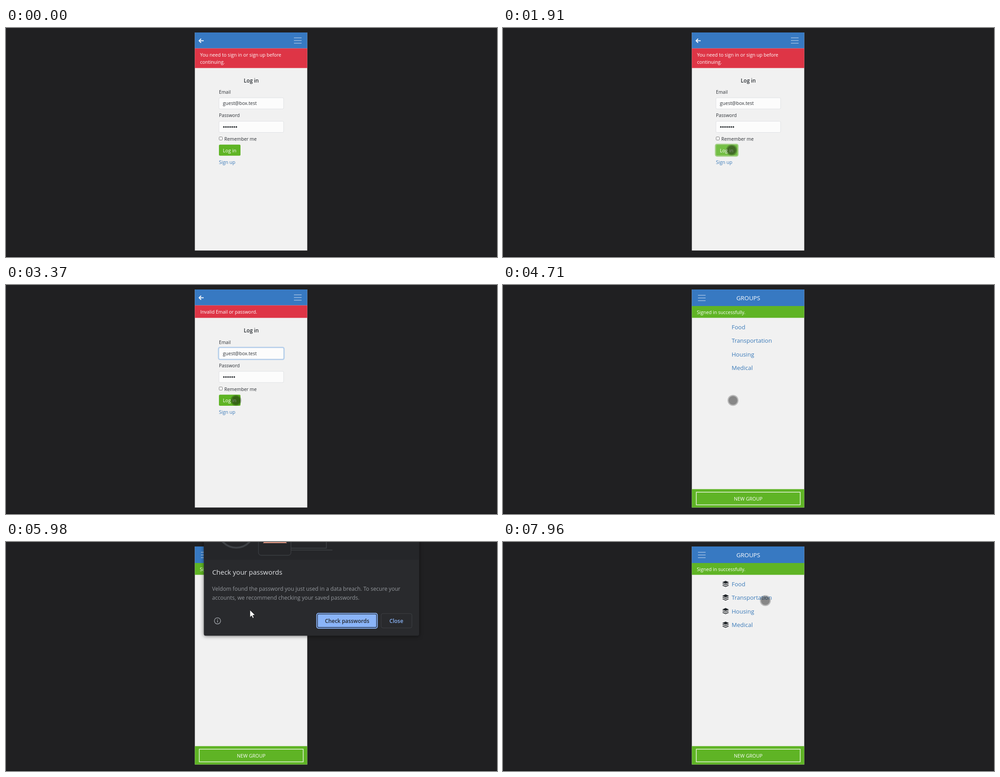
Write an HTML page with a canvas that moves like this. It is 1093 px wide and 512 px high and loops after 8000 ms.

```html
<!DOCTYPE html>
<html lang="en">
<head>
<meta charset="utf-8">
<title>Sign in flow</title>
<style>
html, body { margin: 0; width: 100%; height: 100%; overflow: hidden; background: #202022; }
canvas { display: block; }
</style>
</head>
<body>
<canvas id="stage" width="1093" height="512"></canvas>
<script>
const W = 1093, H = 512, LOOP = 8000;
const LEFT = 420.4, WIDE = 250.2, TOP = 10, BOTTOM = 497.5;
const BLUE = '#3779c2', GREEN = '#5fb425', RED = '#de3546', INK = '#2b2f34',
      LINK = '#3a7ab9', PAGE = '#f1f1f1', SKY = '#8ab4f8', EDGE = '#3f4246';

const main = document.getElementById('stage').getContext('2d');
const layerCanvas = document.createElement('canvas');
layerCanvas.width = W;
layerCanvas.height = H;
const layer = layerCanvas.getContext('2d');
let c = main;

const clamp = v => Math.max(0, Math.min(1, v));
const ramp = (t, from, to) => clamp((t - from) / (to - from));

function text(str, x, y, size, color, weight = 400, align = 'left') {
  c.font = `${weight} ${size}px "Open Sans", "Noto Sans", sans-serif`;
  c.textAlign = align;
  c.fillStyle = color;
  c.fillText(str, x, y);
}

function rect(x, y, w, h, color) {
  c.fillStyle = color;
  c.fillRect(x, y, w, h);
}

const band = (top, bottom, color) => rect(LEFT, top, WIDE, bottom - top, color);

function box(x, y, w, h, r, fill, stroke, width = 1) {
  c.beginPath();
  c.roundRect(x, y, w, h, r);
  if (fill) { c.fillStyle = fill; c.fill(); }
  if (stroke) { c.strokeStyle = stroke; c.lineWidth = width; c.stroke(); }
}

function line(points, color, width) {
  c.beginPath();
  points.forEach(([x, y]) => c.lineTo(x, y));
  c.strokeStyle = color;
  c.lineWidth = width;
  c.stroke();
}

function poly(points, fill) {
  c.beginPath();
  points.forEach(([x, y]) => c.lineTo(x, y));
  c.closePath();
  c.fillStyle = fill;
  c.fill();
}

function disc(x, y, r, color) {
  c.beginPath();
  c.arc(x, y, r, 0, Math.PI * 2);
  c.fillStyle = color;
  c.fill();
}

function menu(x, y) {
  for (let i = -1; i < 2; i++) line([[x, y + i * 6], [x + 17, y + i * 6]], 'rgba(255,255,255,.6)', 1.3);
}

function glow(x, y, w, h, color, alpha) {
  if (!alpha) return;
  c.globalAlpha = alpha;
  box(x - 1, y - 1, w + 2, h + 2, 3.5, null, color, 2.6);
  c.globalAlpha = 1;
}

// Login page
function drawLogin(t) {
  const retry = t >= 1980, dy = retry ? -15.5 : 0;
  band(TOP, 45.5, BLUE);
  line([[440, 28.5], [430, 28.5]], '#fff', 1.9);
  line([[434.3, 24], [429.8, 28.5], [434.3, 33]], '#fff', 1.9);
  menu(641, 28);
  band(45.5, retry ? 73.5 : 89.5, RED);
  if (retry) {
    text('Invalid Email or password.', 432.5, 64, 10.4, '#fff');
  } else {
    text('You need to sign in or sign up before', 432, 64, 10.6, '#fff');
    text('continuing.', 432, 79.7, 10.6, '#fff');
  }

  c.save();
  c.translate(0, dy);
  text('Log in', 546, 121.6, 11.6, INK, 600, 'center');
  text('Email', 474, 147.2, 10.3, INK);
  box(474, 156, 144, 25, 2.5, '#fcfcfc', '#dfe1e4');
  glow(474, 156, 144, 25, '#b5cfec', ramp(t, 2590, 2730) * (1 - ramp(t, 3500, 3630)));
  text('guest@box.test', 482.8, 172, 10.5, INK);
  text('Password', 474, 199.2, 10.3, INK);
  box(474, 208.5, 144, 25, 2.5, '#fcfcfc', '#dfe1e4');
  const dots = !retry ? 7 : t < 2110 ? 0 : 6;
  for (let i = 0; i < dots; i++) disc(485 + i * 4.62, 221.2, 1.75, '#212529');
  box(474.5, 243.5, 7, 7, 1.2, '#fff', '#777', 1);
  text('Remember me', 486, 252, 10.4, INK);
  const focus = retry ? ramp(t, 3500, 3630) : ramp(t, 1360, 1500);
  box(474, 260.8, 48, 24.6, 2.5, GREEN);
  if (focus) {
    c.globalAlpha = focus;
    box(474, 260.8, 48, 24.6, 2.5, '#74bf45');
    c.globalAlpha = 1;
  }
  glow(474, 261, 48, 24.4, '#a3cf85', focus);
  text('Log in', 482.8, 277.6, 10.7, '#fff');
  text('Sign up', 474, 303.5, 10.6, LINK);
  c.restore();
}

// Groups page
function layersIcon(x, y) {
  const ink = '#212529';
  poly([[x - 7.5, y - 3.4], [x, y - 6.8], [x + 7.5, y - 3.4], [x, y]], ink);
  for (const d of [0, 3.7]) {
    poly([[x - 7.5, y + d], [x - 5.6, y - 0.9 + d], [x, y + 1.6 + d], [x + 5.6, y - 0.9 + d],
          [x + 7.5, y + d], [x, y + 3.3 + d]], ink);
  }
}

function drawGroups(t) {
  band(TOP, 47, BLUE);
  menu(434, 29);
  text('GROUPS', 546, 33.8, 13.3, '#fff', 400, 'center');
  band(47, 73.4, GREEN);
  text('Signed in successfully.', 431.6, 65, 10.5, '#fff');
  ['Food', 'Transportation', 'Housing', 'Medical'].forEach((name, i) => {
    const y = 93.5 + i * 30.4;
    if (t >= 4780) layersIcon(495.5, y);
    text(name, 509, y + 5.2, 13, LINK);
  });
  band(456.4, BOTTOM, GREEN);
  box(430.3, 463.2, 231.3, 28.3, 0, null, '#e9f5df', 1.5);
  text('NEW GROUP', 545.8, 481.6, 10.7, '#fff', 400, 'center');
}

// Password warning
function drawDialog(t) {
  const rest = 1 - ramp(t, 5770, 6050);
  const scale = 1 - 0.07 * Math.pow(rest, 1.5);
  const drop = 2 * clamp((1 - scale) / 0.008);
  const alpha = ramp(t, 5700, 5910) * (1 - Math.pow(ramp(t, 7080, 7290), 3.2));

  c = layer;
  c.clearRect(0, 0, W, H);
  c.save();
  c.translate(680, 207 + drop);
  c.scale(scale, scale);
  c.translate(-680, -207);

  c.save();
  c.shadowColor = 'rgba(0,0,0,.5)';
  c.shadowBlur = 8;
  c.shadowOffsetY = 1;
  box(438.4, -60, 483.4, 267.5, 4, '#292a2d');
  c.restore();
  rect(438.4, -60, 483.4, 96, '#252629');

  c.beginPath();
  c.arc(511, -32, 41, 0, Math.PI);
  c.strokeStyle = EDGE;
  c.lineWidth = 4;
  c.stroke();
  box(561, -40, 73, 66, 6, '#252629', EDGE, 1.2);
  poly([[577, -8], [619, -8], [625, -1.3], [571, -1.3]], '#dc9582');
  line([[634, 10], [713.5, 10], [713.5, -30]], EDGE, 1.5);
  line([[634, 14.3], [727, 14.3]], EDGE, 1.5);

  text('Check your passwords', 457, 69.8, 15.1, '#e3e5e8');
  text('Veldom found the password you just used in a data breach. To secure your', 456.8, 106, 12.2, '#94989d');
  text('accounts, we recommend checking your saved passwords.', 456.8, 126.7, 12.2, '#94989d');

  c.beginPath();
  c.arc(469, 174, 7, 0, Math.PI * 2);
  c.strokeStyle = '#a4a8ad';
  c.lineWidth = 1.4;
  c.stroke();
  rect(468.3, 172.8, 1.5, 4.8, '#a4a8ad');
  rect(468.3, 170, 1.5, 1.6, '#a4a8ad');

  if (t < 7080) {
    box(691.8, 157, 136, 33.6, 4, '#202a3c', SKY, 2);
    box(694.2, 159.4, 131.2, 28.8, 2, SKY);
  } else {
    box(692.2, 157.2, 135.4, 33, 4, SKY);
  }
  text('Check passwords', 760, 178.3, 12, '#25282d', 600, 'center');
  box(836.5, 157.5, 69, 32.5, 4, null, EDGE);
  text('Close', 870.5, 178.3, 12, SKY, 600, 'center');
  c.restore();

  c = main;
  c.globalAlpha = alpha;
  c.drawImage(layerCanvas, 0, 0);
  c.globalAlpha = 1;
}

// Pointer moves: start, end, steps, x, y
const moves = [
  [500, 500, 1, 612, 316],
  [700, 1030, 6, 520, 225],
  [1100, 1360, 5, 509, 273],
  [1980, 2250, 5, 512, 258],
  [5370, 5510, 3, 541, 189],
  [5770, 5840, 2, 543, 152],
  [6050, 6450, 7, 800, 168],
  [6650, 6850, 4, 869, 172],
  [7490, 7960, 8, 584, 131]
];

function pointerAt(t) {
  let x = 675, y = 340;
  for (const [from, to, steps, tx, ty] of moves) {
    if (t < from) break;
    const gap = (to - from) / (steps - 1 || 1) || 1;
    const k = clamp((Math.floor((t - from) / gap + 1e-6) + 1) / steps);
    const e = k * k * (3 - 2 * k);
    x += (tx - x) * e;
    y += (ty - y) * e;
  }
  return [x, y];
}

function drawPointer(t, overDialog) {
  if (t < 430) return;
  const [x, y] = pointerAt(t);
  if (overDialog || x > 671) {
    const shape = [[0, 0], [0, 16.4], [3.8, 12.9], [6.2, 18.4], [8.9, 17.2], [6.5, 11.9], [11.6, 11.5]]
      .map(([px, py]) => [x + px, y + py]);
    poly(shape, '#fff');
    line([...shape, shape[0]], '#17181a', 0.9);
  } else {
    disc(x, y, 12.2, 'rgba(0,0,0,.23)');
    disc(x, y, 9.8, 'rgba(0,0,0,.27)');
  }
}

function draw(t) {
  rect(0, 0, W, H, '#202022');
  rect(0, 510, W, 2, '#19191b');
  band(TOP, BOTTOM, PAGE);
  if (t < 4710) drawLogin(t);
  else drawGroups(t);
  const dialog = t >= 5770 && t < 7290;
  if (dialog) drawDialog(t);
  drawPointer(t, dialog);
}

const start = performance.now();
function tick() {
  draw((performance.now() - start) % LOOP);
  requestAnimationFrame(tick);
}
tick();
</script>
</body>
</html>
```
